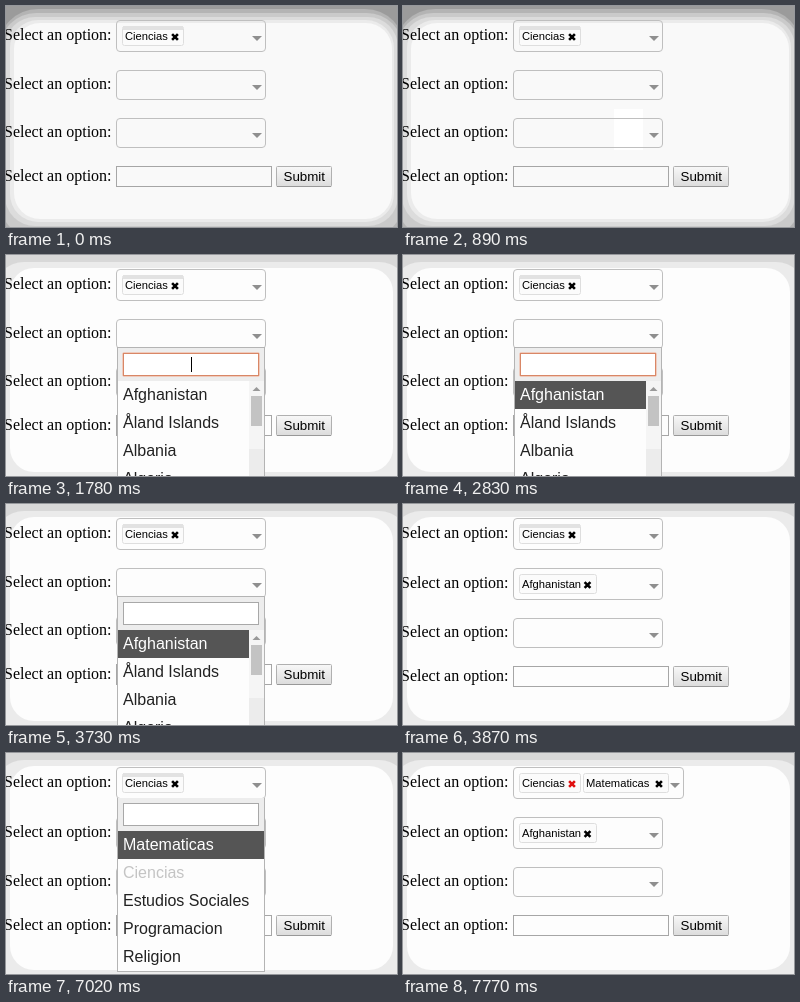
Recreate the animation shown at these times as an HTML page. Size 391 by 221 pixels, loop 8000 ms.

```html
<!DOCTYPE html>
<html lang="en">
<head>
<meta charset="utf-8">
<title>Select form</title>
<style>
html, body { margin: 0; width: 100%; height: 100%; overflow: hidden; background: #fdfdfd; }
svg { display: block; width: 391px; height: 221px; }
.label { font: 16px "Liberation Serif", "Times New Roman", serif; }
.tag { font: 11.2px "Liberation Sans", Arial, sans-serif; }
.item { font: 16px "Liberation Sans", Arial, sans-serif; fill: #222; }
.button { font: 13.333px "Liberation Sans", Arial, sans-serif; }
.picked { fill: #fff; }
.off { fill: #c4c4c4; }
.box { fill: none; stroke: #bfbfbf; }
.chip { fill: #fbfbfb; stroke: #dedede; }
.arrow { fill: #8f8f8f; }
.cross { fill: none; stroke: #000; stroke-width: 2.6; }

/* Every change is instant; 1% is 80 ms. */
.anim { animation: 8s step-end infinite; }

.dim { animation-name: dim; }
@keyframes dim { 0% { opacity: 1 } 22.25%, 100% { opacity: 0 } }

.p1 { animation-name: p1; }
.p2 { animation-name: p2; }
.p3 { animation-name: p3; }
.p4 { animation-name: p4; }
.p5 { animation-name: p5; }
@keyframes p1 { 0% { opacity: 0 } 9.25%, 100% { opacity: 1 } }
@keyframes p2 { 0% { opacity: 0 } 11.125%, 100% { opacity: 1 } }
@keyframes p3 { 0% { opacity: 0 } 13%, 100% { opacity: 1 } }
@keyframes p4 { 0% { opacity: 0 } 14.875%, 100% { opacity: 1 } }
@keyframes p5 { 0% { opacity: 0 } 16.625%, 100% { opacity: 1 } }

/* The second select grows when it receives a tag. */
.empty { animation-name: empty; }
.filled { animation-name: filled; }
.shift1 { animation-name: shift1; }
.shift2 { animation-name: shift2; }
@keyframes empty { 0% { opacity: 1 } 48.375%, 100% { opacity: 0 } }
@keyframes filled { 0% { opacity: 0 } 48.375%, 100% { opacity: 1 } }
@keyframes shift1 { 0% { transform: none } 48.375%, 100% { transform: translateY(1px) } }
@keyframes shift2 { 0% { transform: none } 48.375%, 100% { transform: translateY(2px) } }

.narrow { animation-name: narrow; }
.wide { animation-name: wide; }
.hot { animation-name: hot; }
@keyframes narrow { 0% { opacity: 1 } 89.625%, 100% { opacity: 0 } }
@keyframes wide { 0% { opacity: 0 } 89.625%, 100% { opacity: 1 } }
@keyframes hot { 0% { stroke: #000 } 97.125%, 100% { stroke: #e01010 } }

.countries { animation-name: countries; }
.countries .focus { animation-name: focusA; }
.countries .caret { animation-name: caretA; }
.countries .hover { animation-name: hoverA; }
@keyframes countries { 0% { opacity: 0 } 22.25% { opacity: 1 } 48.375%, 100% { opacity: 0 } }
@keyframes focusA { 0% { opacity: 1 } 46.625%, 100% { opacity: 0 } }
@keyframes caretA { 0% { opacity: 1 } 29.75% { opacity: 0 } 37.25% { opacity: 1 } 44.75%, 100% { opacity: 0 } }
@keyframes hoverA { 0% { opacity: 0 } 35.375%, 100% { opacity: 1 } }

.subjects { animation-name: subjects; }
.subjects .focus { animation-name: focusB; }
.subjects .caret { animation-name: caretB; }
.subjects .hover { animation-name: hoverB; }
@keyframes subjects { 0% { opacity: 0 } 76.5% { opacity: 1 } 89.625%, 100% { opacity: 0 } }
@keyframes focusB { 0% { opacity: 1 } 87.75%, 100% { opacity: 0 } }
@keyframes caretB { 0% { opacity: 1 } 84%, 100% { opacity: 0 } }
@keyframes hoverB { 0% { opacity: 0 } 85.875%, 100% { opacity: 1 } }
</style>
</head>
<body>
<svg viewBox="0 0 391 221">
  <defs>
    <linearGradient id="face" x2="0" y2="1">
      <stop offset="0" stop-color="#f8f8f8"/>
      <stop offset="1" stop-color="#dcdcdc"/>
    </linearGradient>
    <path id="arrow" class="arrow" d="M-5 0H5L0 5Z"/>
    <path id="cross" d="M-2.9-2.9 2.9 2.9M2.9-2.9-2.9 2.9"/>
    <g id="search">
      <rect x="112" y="45" width="146" height="33" fill="#ededed"/>
      <rect x="117.5" y="50.5" width="135" height="22" fill="#fff" stroke="#a8a8a8"/>
    </g>
    <g id="ring" fill="none">
      <rect x="116.5" y="49.5" width="137" height="24" rx="1.5" stroke="#efcbbd"/>
      <rect x="117.5" y="50.5" width="135" height="22" stroke="#d98766"/>
    </g>
  </defs>

  <!-- Page and its banded edge -->
  <rect width="391" height="221" fill="#d8d8d8"/>
  <rect x="-12" y="7" width="415" height="260" rx="30" fill="#ebebeb"/>
  <rect x="4" y="13" width="383" height="204" rx="24" fill="#fdfdfd"/>
  <g class="anim dim">
    <rect width="391" height="221" fill="#9b9b9b"/>
    <rect x="-8" y="3" width="407" height="240" rx="40" fill="#b4b4b4"/>
    <rect x="-6" y="7" width="403" height="225" rx="36" fill="#cacaca"/>
    <rect x="-1" y="11" width="393" height="209" rx="30" fill="#dcdcdc"/>
    <rect x="4" y="14" width="384" height="202" rx="28" fill="#ebebeb"/>
    <rect x="8" y="17" width="378" height="196" rx="26" fill="#f9f9f9"/>
    <g fill="#fff">
      <rect class="anim p1" x="211" y="124" width="12" height="20"/>
      <rect class="anim p2" x="211" y="103" width="29" height="41"/>
      <rect class="anim p3" x="228" y="90" width="23" height="33"/>
      <rect class="anim p4" x="239" y="83" width="17" height="27"/>
      <rect class="anim p5" x="244" y="79" width="14" height="24"/>
    </g>
  </g>

  <!-- First select -->
  <text class="label" x="-2" y="34">Select an option:</text>
  <g class="anim narrow">
    <rect class="box" x="110.5" y="14.5" width="149" height="31" rx="3.5"/>
    <use href="#arrow" x="251" y="30"/>
  </g>
  <g class="anim wide">
    <rect class="box" x="110.5" y="14.5" width="170" height="31" rx="3.5"/>
    <use href="#arrow" x="272" y="30"/>
    <rect class="chip" x="180.5" y="20.5" width="85" height="19" rx="2"/>
    <text class="tag" x="183" y="34">Matematicas</text>
    <use href="#cross" class="cross" x="256" y="31"/>
  </g>
  <rect class="chip" x="116.5" y="20.5" width="61" height="19" rx="2"/>
  <rect class="anim narrow" x="117" y="20" width="60" height="4" fill="#e2e2e2"/>
  <text class="tag" x="119" y="34">Ciencias</text>
  <use href="#cross" class="cross anim hot" x="169" y="31"/>

  <!-- Second select -->
  <g class="anim shift1">
    <text class="label" x="-2" y="83">Select an option:</text>
    <use href="#arrow" x="251" y="79"/>
  </g>
  <rect class="box anim empty" x="110.5" y="64.5" width="149" height="29" rx="3.5"/>
  <g class="anim filled">
    <rect class="box" x="110.5" y="64.5" width="149" height="31" rx="3.5"/>
    <rect class="chip" x="116.5" y="70.5" width="77" height="19" rx="2"/>
    <text class="tag" x="119" y="84">Afghanistan</text>
    <use href="#cross" class="cross" x="184.5" y="81"/>
  </g>

  <!-- Third select, input and button -->
  <g class="anim shift2">
    <text class="label" x="-2" y="131">Select an option:</text>
    <rect class="box" x="110.5" y="112.5" width="149" height="29" rx="3.5"/>
    <use href="#arrow" x="251" y="127"/>
    <text class="label" x="-2" y="175">Select an option:</text>
    <rect x="110.5" y="160.5" width="155" height="20" fill="none" stroke="#a6a6a6"/>
    <rect x="270.5" y="160.5" width="55" height="20" rx="1" fill="url(#face)" stroke="#b0b0b0"/>
    <path d="M271 180.5H325" stroke="#989898"/>
    <text class="button" x="277.5" y="175">Submit</text>
  </g>

  <!-- Country list -->
  <g class="anim countries">
    <rect x="111.5" y="92.5" width="147" height="140" fill="#fdfdfd" stroke="#b4b4b4"/>
    <use href="#search" y="48"/>
    <use href="#ring" class="anim focus" y="48"/>
    <rect class="anim caret" x="185" y="102" width="1" height="15"/>
    <g class="item">
      <text x="117" y="145">Afghanistan</text>
      <text x="117" y="173">Åland Islands</text>
      <text x="117" y="201">Albania</text>
      <text x="117" y="229">Algeria</text>
    </g>
    <g class="anim hover">
      <rect x="112" y="126" width="131" height="28" fill="#555"/>
      <text class="item picked" x="117" y="145">Afghanistan</text>
    </g>
    <rect x="243" y="126" width="15" height="95" fill="#f5f5f5"/>
    <rect x="243" y="194" width="15" height="27" fill="#ececec"/>
    <path d="M246.5 136H254.5L250.5 132Z" fill="#999"/>
    <rect x="245" y="141" width="11" height="30" fill="#c3c3c3"/>
  </g>

  <!-- Subject list -->
  <g class="anim subjects">
    <rect x="111.5" y="45.5" width="147" height="173" fill="#fdfdfd" stroke="#b4b4b4"/>
    <use href="#search"/>
    <use href="#ring" class="anim focus"/>
    <rect class="anim caret" x="185" y="54" width="1" height="15"/>
    <g class="item">
      <text x="117" y="97">Matematicas</text>
      <text class="off" x="117" y="125">Ciencias</text>
      <text x="117" y="153">Estudios Sociales</text>
      <text x="117" y="181">Programacion</text>
      <text x="117" y="209">Religion</text>
    </g>
    <g class="anim hover">
      <rect x="112" y="78" width="146" height="28" fill="#555"/>
      <text class="item picked" x="117" y="97">Matematicas</text>
    </g>
  </g>
</svg>
</body>
</html>
```
